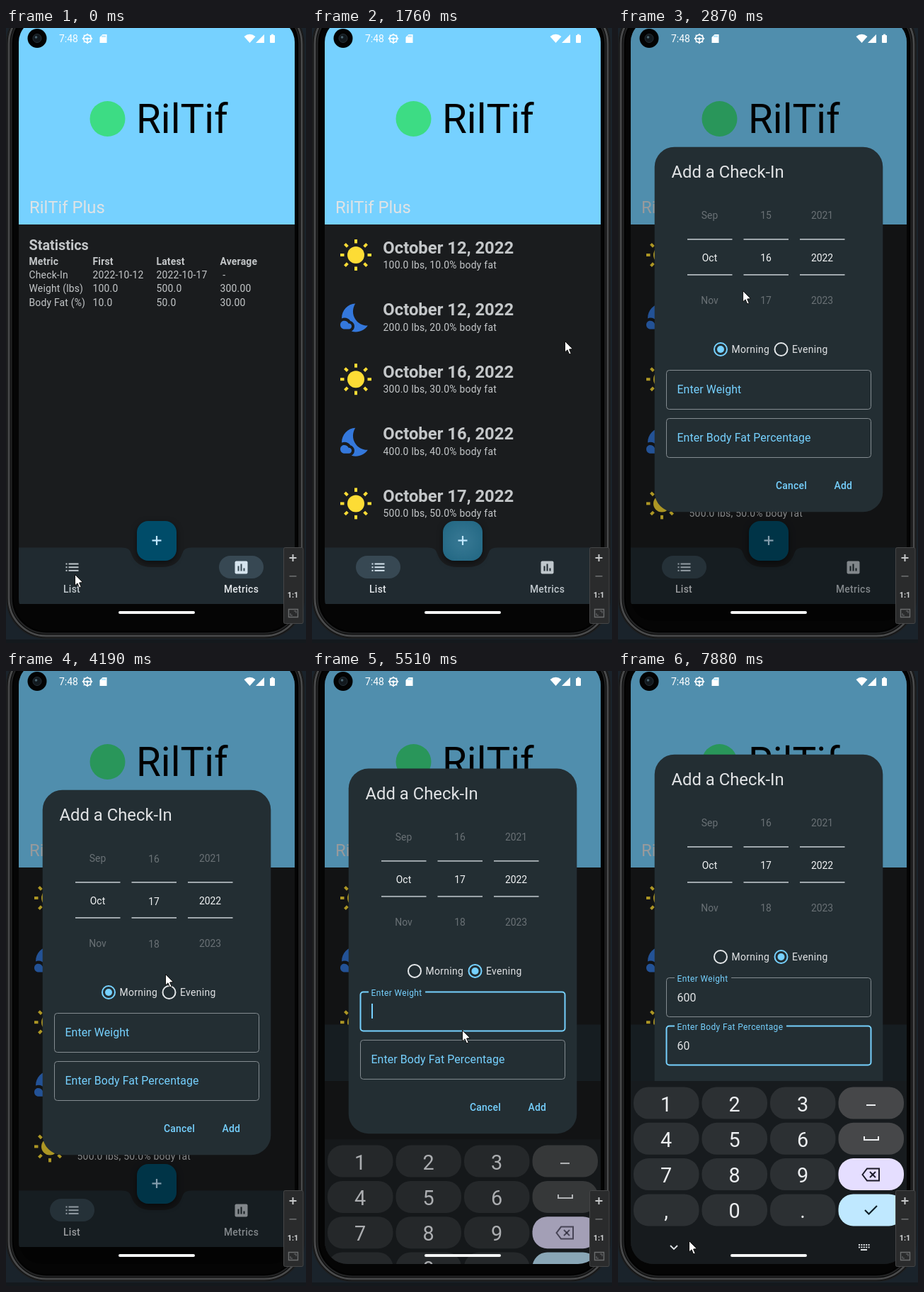
These frames come from a looping animation (424 by 867 pixels, 8 s). An HTML page with a canvas:

```html
<!DOCTYPE html>
<html lang="en">
<head>
<meta charset="utf-8">
<title>Check-in tracker</title>
<style>
html, body { margin: 0; width: 100%; height: 100%; overflow: hidden; background: #1a232b; }
canvas { display: block; width: 424px; height: 867px; }
</style>
</head>
<body>
<canvas id="stage"></canvas>
<script>
const W = 424, H = 867, LOOP = 8000;
const DP = 0.993; // stage pixels per device-independent pixel
const CYAN = '#76d1ff', SHEET = '#232e33', INK = '#e1e3e5', SOFT = '#c4c7c9', NAV = '#202a30', DARK = '#1a1c1e';
const canvas = document.getElementById('stage');
const g = canvas.getContext('2d');
const ratio = window.devicePixelRatio || 1;
canvas.width = W * ratio;
canvas.height = H * ratio;

// The screen refreshes in bursts: [start, end, updates].
const bursts = [[120, 120, 1], [400, 1210, 7], [1640, 2270, 6], [2570, 3560, 8], [3680, 4700, 9],
  [4850, 5780, 8], [5930, 6180, 2], [6460, 6970, 5], [7370, 7880, 5]];

// Pointer path: [time, x, y].
const path = [[0, 97, 770], [119, 97, 770], [120, 93, 770], [670, 93, 770], [1210, 212, 722], [1640, 212, 722],
  [1766, 357, 441], [2270, 363, 434], [2570, 363, 434], [2853, 176, 370], [2995, 168, 380], [3250, 202, 372],
  [3560, 205, 335], [3900, 207, 345], [4190, 225, 427], [4400, 231, 452], [4700, 260, 461], [4850, 258, 463],
  [5250, 212, 506], [7370, 212, 506], [7880, 100, 803]];

const clamp = v => Math.max(0, Math.min(1, v));
const span = (t, a, b) => clamp((t - a) / (b - a));
const mix = (a, b, p) => a + (b - a) * p;

function snap(t) {
  let s = 0;
  for (const [a, b, n] of bursts) {
    if (t < a) break;
    const dt = (b - a) / (n - 1) || 1;
    s = a + Math.min(n - 1, Math.floor((t - a) / dt + 0.1)) * dt;
  }
  return s;
}

function pointerAt(t) {
  const i = path.findIndex(k => k[0] > t);
  if (i < 0) return path[path.length - 1].slice(1);
  const a = path[i - 1], b = path[i], p = span(t, a[0], b[0]);
  return [mix(a[1], b[1], p), mix(a[2], b[2], p)];
}

function setFont(size, weight, gap) {
  g.font = `${weight} ${size * DP}px Roboto, sans-serif`;
  g.letterSpacing = gap + 'px';
}

function text(s, x, y, size, color, { weight = 400, align = 'left', gap = 0 } = {}) {
  setFont(size, weight, gap);
  g.textAlign = align;
  g.fillStyle = color;
  g.fillText(s, x, y);
}

function rect(x, y, w, h, color) {
  g.fillStyle = color;
  g.fillRect(x, y, w, h);
}

function box(x, y, w, h, r, fill, stroke, line = 1) {
  g.beginPath();
  g.roundRect(x, y, w, h, r);
  if (fill) { g.fillStyle = fill; g.fill(); }
  if (stroke) { g.strokeStyle = stroke; g.lineWidth = line; g.stroke(); }
}

function disc(x, y, r, fill, stroke, line = 2) {
  g.beginPath();
  g.arc(x, y, r, 0, Math.PI * 2);
  if (fill) { g.fillStyle = fill; g.fill(); }
  if (stroke) { g.strokeStyle = stroke; g.lineWidth = line; g.stroke(); }
}

function poly(points, fill, stroke, line = 2, close = true) {
  g.beginPath();
  points.forEach(([x, y]) => g.lineTo(x, y));
  if (close) g.closePath();
  if (fill) { g.fillStyle = fill; g.fill(); }
  if (stroke) { g.strokeStyle = stroke; g.lineWidth = line; g.stroke(); }
}

function plus(x, y, r, line, color) {
  rect(x - r, y - line / 2, r * 2, line, color);
  rect(x - line / 2, y - r, line, r * 2, color);
}

function faded(alpha, draw) {
  g.save();
  g.globalAlpha *= alpha;
  draw();
  g.restore();
}

function drawPhone() {
  rect(0, 0, W, H, '#1a232b');
  rect(0, 862, W, 5, '#14191d');
  const ring = (inset, color, line) =>
    box(1 + inset, -34 + inset, 420 - inset * 2, 894 - inset * 2, 56 - inset, '#050505', color, line);
  ring(0, '#1c1d1e', 2);
  ring(3, '#48494a', 3);
  ring(6.5, '#242526', 2);
  ring(9, '#000', 1);
}

function drawHeader() {
  rect(18, -12, 390, 289, CYAN);
  disc(143.5, 128, 25, '#3ddc84');
  text('RilTif', 184, 148, 57, '#000');
  text('RilTif Plus', 33, 261, 24, '#dfe3e6');
}

function drawStats() {
  const rows = [['Metric', 'First', 'Latest', 'Average'], ['Check-In', '2022-10-12', '2022-10-17', ' -'],
    ['Weight (lbs)', '100.0', '500.0', '300.00'], ['Body Fat (%)', '10.0', '50.0', '30.00']];
  text('Statistics', 32.5, 313.3, 20, SOFT, { weight: 700 });
  rows.forEach((row, i) => row.forEach((s, j) =>
    text(s, 32.5 + j * 90, 334.2 + i * 19.1, 14, SOFT, { weight: i ? 400 : 700, gap: 0.2 })));
}

function drawSun(x, y) {
  disc(x, y, 12, '#fddc35');
  for (let i = 0; i < 8; i++) {
    g.save();
    g.translate(x, y);
    g.rotate(i * Math.PI / 4);
    rect(16.5, -2, 5.5, 4, '#fddc35');
    g.restore();
  }
}

const moon = new Path2D('M19.8 17.5C17.3 17.5 13.2 16.2 11.1 12.1 8.8 7.6 10.6 3.6 11.6 2 6.3 2.2 2 6.6 2 12.4' +
  'C4.4 11.4 7 12.4 8.1 14.2 11.6 15.2 12 19.8 8.9 21.5 13.4 22.9 18 21 20.4 17.5Z' +
  'M7 16H6.8C5.9 13.4 1 13.2 1 17 1 18.7 2.3 20 4 20H7C9.7 20 9.7 16 7 16Z');

function drawMoon(x, y) {
  g.save();
  g.translate(x, y);
  g.scale(2, 2);
  g.fillStyle = '#3478dc';
  g.fill(moon);
  g.restore();
}

function drawList() {
  [12, 12, 16, 16, 17].forEach((day, i) => {
    const y = i * 87.6, n = i + 1;
    if (i % 2) drawMoon(38, 297 + y);
    else drawSun(62, 320 + y);
    text(`October ${day}, 2022`, 100.3, 317.5 + y, 24, SOFT, { weight: 700 });
    text(`${n}00.0 lbs, ${n}0.0% body fat`, 100.5, 339 + y, 14, SOFT, { gap: 0.26 });
  });
}

function drawNav(t) {
  const swap = span(t, 530, 800), press = span(t, 1600, 1766) * (1 - span(t, 1766, 2140));
  const top = 732.6;
  g.beginPath();
  g.moveTo(18, top);
  g.lineTo(164, top);
  g.quadraticCurveTo(175, top, 177, 741);
  g.bezierCurveTo(181, 754, 192, 760, 205, 760);
  g.lineTo(221, 760);
  g.bezierCurveTo(234, 760, 245, 754, 249, 741);
  g.quadraticCurveTo(251, top, 262, top);
  g.lineTo(408, top);
  g.lineTo(408, 812);
  g.lineTo(18, 812);
  g.fillStyle = NAV;
  g.fill();

  const pill = (x, p) => faded(p, () => box(x - mix(14, 31.5, p), 744, mix(28, 63, p), 32, 16, '#374853'));
  pill(93.5, swap);
  pill(332.5, 1 - swap);
  const ripple = span(t, 300, 660) * (1 - span(t, 700, 1080));
  if (ripple) faded(ripple * 0.12, () => box(62, 744, 63, 32, 16, '#fff'));

  const tone = on => on ? '#d6e4ee' : '#bfc7cc';
  const listOn = swap > 0.5;
  for (let i = 0; i < 3; i++) {
    rect(84.5, 754.5 + i * 4.7, 2, 2, tone(listOn));
    rect(88.5, 754.5 + i * 4.7, 14, 2, tone(listOn));
  }
  box(323.5, 751.5, 18, 18, 2, tone(!listOn));
  [[327.5, 7], [331.5, 10], [335.5, 4]].forEach(([x, h]) => rect(x, 765.5 - h, 2, h, listOn ? NAV : '#374853'));
  const label = (s, x, on) => text(s, x, 796, 14, on ? '#e2e6e9' : '#bfc7cc', { weight: 500, align: 'center', gap: 0.3 });
  label('List', 93, listOn);
  label('Metrics', 332.5, !listOn);

  g.save();
  g.shadowColor = 'rgba(0,0,0,.5)';
  g.shadowBlur = 8 * ratio;
  g.shadowOffsetY = 3 * ratio;
  box(185, 695, 56, 56, 16, '#004c69');
  g.restore();
  if (press) {
    const glow = g.createRadialGradient(213, 723, 10, 213, 723, 40);
    glow.addColorStop(0, 'rgba(195,232,255,.26)');
    glow.addColorStop(1, 'rgba(195,232,255,.16)');
    faded(press, () => box(185, 695, 56, 56, 16, glow));
  }
  plus(213, 722.5, 6.5, 2.2, '#c3e8ff');
}

function drawPicker(t) {
  const day = 16 + (t < 3600 ? 0.6 * span(t, 3000, 3560) : mix(0.6, 0.98, span(t, 3680, 4190)) + 0.02 * span(t, 4190, 4317));
  const months = ['Aug', 'Sep', 'Oct', 'Nov', 'Dec'];
  const columns = [[129.5, 2, i => months[i]], [209, day, String], [288.5, 2022, String]];
  columns.forEach(([x, value, name]) => {
    g.save();
    g.beginPath();
    g.rect(x - 32, 250, 64, 150);
    g.clip();
    const mid = Math.round(value);
    for (let i = mid - 1; i <= mid + 1; i++) {
      const d = i - value, a = Math.max(0.34, 1 - 0.66 * Math.abs(d));
      faded(a, () => text(name(i), x, 329 + d * 59.7, 14, '#f2f4f5', { align: 'center' }));
    }
    g.restore();
    rect(x - 31.5, 297, 63.5, 1.8, '#adb5ba');
    rect(x - 31.5, 347, 63.5, 1.8, '#adb5ba');
  });
}

function drawRadio(x, label, on) {
  disc(x, 453, 9, null, on ? CYAN : '#e3e6e8');
  if (on) disc(x, 453, 5, CYAN);
  text(label, x + 15.5, 458, 14, INK, { gap: 0.35 });
}

function drawField(y, label, value, focus, lift, caret) {
  box(68.5, y, 289, 55, 4, null, focus ? CYAN : '#848c91', focus ? 2 : 1);
  const size = mix(16, 12, lift), gap = mix(0.1, 0.4, lift);
  if (lift > 0.5) {
    setFont(size, 400, gap);
    rect(80, y - 2, g.measureText(label).width + 8, 4, SHEET);
  }
  text(label, 83.5, y + mix(32.5, 5.8, lift), size, CYAN, { gap });
  text(value, 83.5, y + 33.5, 16, INK, { gap: 0.1 });
  if (caret) rect(84 + value.length * 9, y + 16.5, 2, 21, CYAN);
}

function drawDialog(t) {
  const open = span(t, 1766, 2140);
  if (!open) return;
  const rise = 50 * (1 - Math.pow(1 - span(t, 5380, 5780), 2.25));
  const evening = t > 4430, body = t > 6700;
  const weight = t < 6180 ? '' : t < 6460 ? '6' : t < 6580 ? '60' : '600';
  const fat = t < 6840 ? '' : t < 6965 ? '6' : '60';
  const focus = t > 5240 && !body;
  const ripple = span(t, 4400, 4445) * (1 - span(t, 4445, 4690));

  g.save();
  g.globalAlpha = open;
  g.translate(0, -rise);
  box(51.7, 167.7, 322.6, 514.6, 28, SHEET);
  text('Add a Check-In', 75.5, 211, 24, INK);
  drawPicker(t);
  drawRadio(145, 'Morning', !evening);
  drawRadio(230.5, 'Evening', evening);
  if (ripple) faded(ripple * 0.18, () => disc(230.5, 453, 19, CYAN));
  drawField(482.5, 'Enter Weight', weight, focus, span(t, 5180, 5380), focus && !(t > 5900 && t < 6100));
  drawField(550.5, 'Enter Body Fat Percentage', fat, body, body ? 1 : 0, body && t < 7370);
  text('Cancel', 223, 650, 14, CYAN, { weight: 500, gap: 0.25 });
  text('Add', 305.5, 650, 14, CYAN, { weight: 500, gap: 0.25 });
  g.restore();
}

function drawKeyboard(t) {
  const p = span(t, 5380, 5780);
  if (!p) return;
  const away = Math.pow(1 - p, 2.8);
  g.save();
  g.globalAlpha = 1 - away;
  g.translate(0, 258 * away);
  rect(18, 578, 390, 258, '#171b1e');
  const rows = ['123', '456', '789', ',0.'];
  const side = ['#464749', '#464749', '#e5deff', '#bfe8ff'];
  rows.forEach((row, i) => {
    const y = 586.5 + i * 50.3;
    [...row].forEach((s, j) => {
      box(22 + j * 96.5, y, 92.5, 45, 21, '#2c3033');
      text(s, 68 + j * 96.5, y + 34, 29, '#eceef0', { align: 'center' });
    });
    box(311.5, y, 92.5, 45, 21, side[i]);
  });
  rect(351, 611, 13, 2, '#eceef0');
  poly([[348, 656], [348, 661], [368, 661], [368, 656]], null, '#eceef0', 2, false);
  poly([[345.5, 710], [352, 701.5], [369, 701.5], [369, 718.5], [352, 718.5]], null, '#1c1b29');
  poly([[356, 706], [364, 714]], null, '#1c1b29', 2, false);
  poly([[364, 706], [356, 714]], null, '#1c1b29', 2, false);
  if (t > 6700) {
    poly([[349, 760], [354.5, 765.5], [366, 754]], null, '#10202a', 2.2, false);
  } else {
    poly([[347, 760], [363, 760]], null, '#10202a', 2, false);
    poly([[357.5, 754.5], [363, 760], [357.5, 765.5]], null, '#10202a', 2, false);
    rect(366, 754, 2, 12, '#10202a');
  }
  poly([[74, 810], [79, 815], [84, 810]], null, '#dfe3e6', 1.8, false);
  for (let i = 0; i < 10; i++) rect(340 + (i % 5) * 3.4, 808 + (i > 4) * 3.4, 2, 2, '#dfe3e6');
  rect(343, 815, 9, 2, '#dfe3e6');
  g.restore();
}

function drawStatus() {
  disc(44, 14.5, 13.5, '#030303');
  disc(44, 14.5, 6, '#12191e', '#263038', 1);
  disc(42.5, 13, 1.8, '#4b6470');
  text('7:48', 75, 20, 14, '#fff');
  disc(115, 15, 5.4, null, '#fff', 1.6);
  for (let i = 0; i < 8; i++) {
    const a = i * Math.PI / 4;
    disc(115 + 6.4 * Math.cos(a), 15 + 6.4 * Math.sin(a), 0.9, '#fff');
  }
  rect(110, 14.3, 10, 1.4, '#fff');
  rect(114.3, 15, 1.4, 5, '#fff');
  disc(115, 15, 1.8, '#fff');
  poly([[136.5, 9], [142.5, 9], [142.5, 21], [132.5, 21], [132.5, 13]], '#fff');
  [135.5, 137.5, 139.5].forEach(x => rect(x, 10.5, 1, 2.5, CYAN));
  g.beginPath();
  g.moveTo(344.5, 21);
  g.lineTo(336.5, 12);
  g.quadraticCurveTo(344.5, 5.5, 352.5, 12);
  g.fillStyle = '#fff';
  g.fill();
  poly([[365, 9], [365, 21], [353, 21]], '#fff');
  box(373, 10, 7, 11, 1, '#fff');
  rect(375, 8.7, 3, 2, '#fff');
}

function drawToolbar() {
  box(392.5, 732.5, 27.5, 107, 2, '#2a2b2c', '#454647');
  plus(405.5, 747, 5, 2, '#c6c8c9');
  rect(400.5, 772, 10, 1.6, '#6b6d6e');
  text('1:1', 405.5, 803, 11, '#d0d2d3', { weight: 700, align: 'center' });
  box(399.5, 819.5, 13, 11, 0, null, '#6b6d6e', 1.4);
  poly([[402, 825], [402, 828], [405, 828]], null, '#6b6d6e', 1, false);
  poly([[407, 822], [410, 822], [410, 825]], null, '#6b6d6e', 1, false);
}

function drawPointer(t) {
  const [x, y] = pointerAt(t);
  g.save();
  g.translate(x, y);
  g.lineJoin = 'round';
  poly([[0.5, 0.5], [0.5, 16], [4, 12.8], [6.6, 19], [9.2, 17.9], [6.6, 12], [11.5, 11.6]], '#fff', '#111', 1);
  g.restore();
}

function draw(t) {
  g.setTransform(ratio, 0, 0, ratio, 0, 0);
  drawPhone();
  g.save();
  g.beginPath();
  g.roundRect(18, -12, 390, 848, 32);
  g.clip();

  const typing = t > 5370;
  rect(18, 0, 390, typing ? 836 : 812, DARK);
  drawHeader();
  if (t < 660) drawStats();
  else drawList();
  g.save();
  if (typing) {
    g.translate(0, -234);
    rect(18, 733, 390, 340, DARK);
  }
  drawNav(t);
  g.restore();
  faded(0.32 * span(t, 1766, 2140), () => rect(18, 0, 390, 836, '#000'));
  drawDialog(t);
  drawKeyboard(t);
  box(159, 822, 108, 4, 2, '#f4f5f5');
  g.restore();

  drawStatus();
  drawToolbar();
  drawPointer(t);
}

function tick() {
  draw(snap(performance.now() % LOOP));
  requestAnimationFrame(tick);
}
tick();
</script>
</body>
</html>
```
